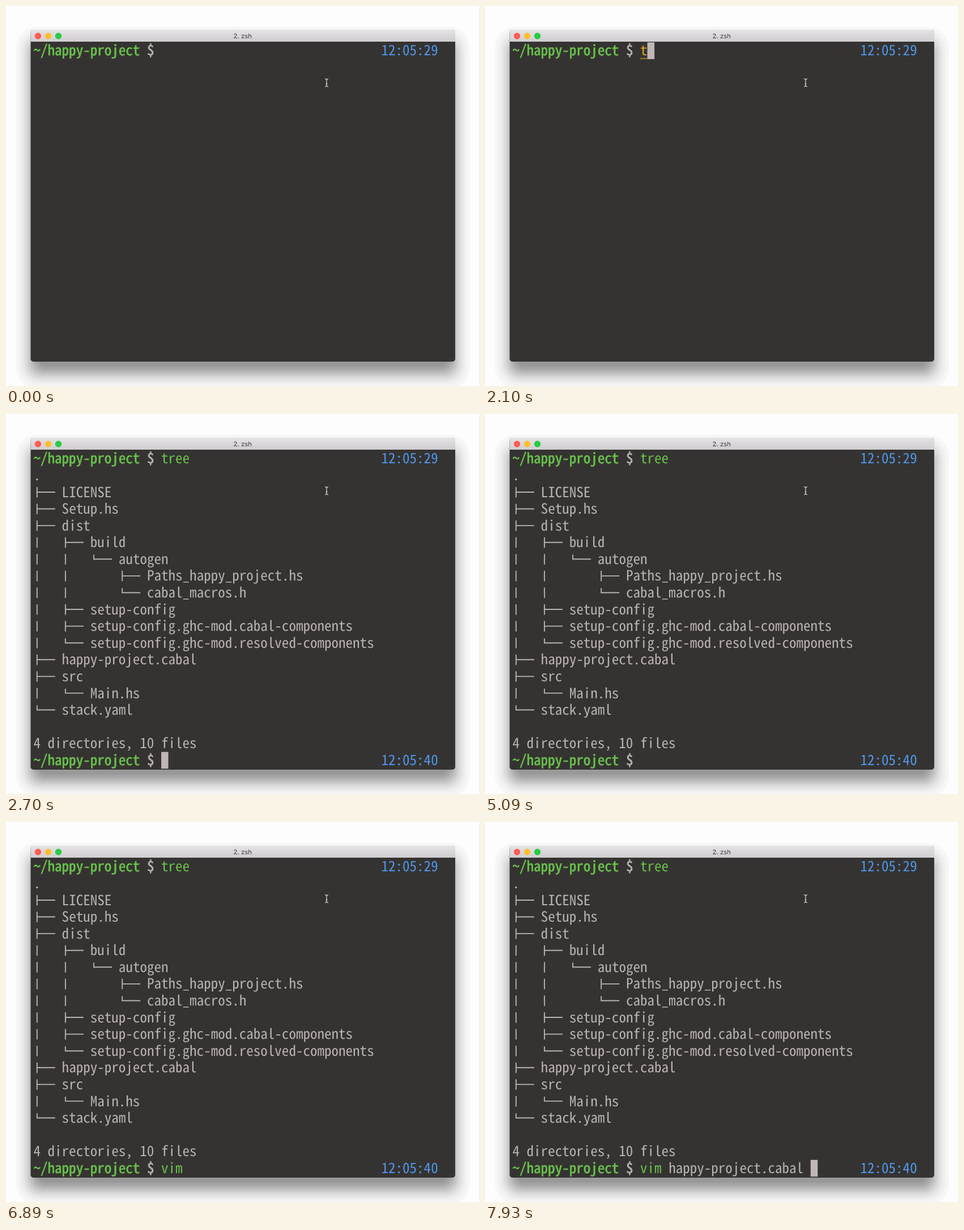
Animation, 835 px wide and 671 px high, one loop 8 s. Source, as an HTML page:

```html
<!DOCTYPE html>
<html lang="en">
<head>
<meta charset="utf-8">
<title>Terminal</title>
<style>
  html, body { margin: 0; width: 100%; height: 100%; overflow: hidden; background: #fdfdfd; }
  svg { display: block; }
  text { white-space: pre; text-rendering: geometricPrecision; }
  .mono { font-family: "Noto Sans Mono CJK JP", "Noto Sans Mono CJK SC", "Noto Sans Mono", monospace; }
  .title { font: 11.4px Inter, sans-serif; fill: #3b3a3b; text-anchor: middle; }
</style>
</head>
<body>
<svg width="835" height="671" viewBox="0 0 835 671">
  <defs>
    <linearGradient id="bar" x2="0" y2="1">
      <stop stop-color="#e5e3e5"/><stop offset="1" stop-color="#cfcdcf"/>
    </linearGradient>
  </defs>
  <g id="shadow"></g>
  <rect x="43.5" y="42" width="749.5" height="586" rx="5" fill="#353331"/>
  <path d="M43.5 63V47q0-5 5-5H788q5 0 5 5V63z" fill="url(#bar)"/>
  <circle cx="56.5" cy="53" r="5.7" fill="#fd5b55"/>
  <circle cx="74.5" cy="53" r="5.7" fill="#fdbd2e"/>
  <circle cx="92.5" cy="53" r="5.7" fill="#28cb41"/>
  <text class="title" x="417.7" y="57.3">2. zsh</text>
  <g id="screen" class="mono"></g>
  <path d="M563 128.5q3 0 3 2.5v9q0 2.5-3 2.5M569 128.5q-3 0-3 2.5m0 9q0 2.5 3 2.5M564.5 137.5h3" fill="none" stroke="#e8e6e5" stroke-width="1.1"/>
</svg>
<script>
const LOOP = 8000, LISTED = 2700;
const CELL = 12.53, ROW = 29.58, LEFT = 48.5, TOP = 64.2;
const GREEN = '#69c24c', GRAY = '#bab3b0', BLUE = '#4e97ec', YELLOW = '#dfa424', CURSOR = '#bfb7b5';
const PROMPT = '~/happy-project', START = 18, LAST_ROW = 18;

const listing = `.
├── LICENSE
├── Setup.hs
├── dist
│   ├── build
│   │   └── autogen
│   │       ├── Paths_happy_project.hs
│   │       └── cabal_macros.h
│   ├── setup-config
│   ├── setup-config.ghc-mod.cabal-components
│   └── setup-config.ghc-mod.resolved-components
├── happy-project.cabal
├── src
│   └── Main.hs
└── stack.yaml

4 directories, 10 files`.split('\n');

// [start time, typed input, cursor visible]
const steps = [
  [0, '', false], [600, '', true], [1650, '', false],
  [2100, 't', true], [2250, 'tr', true], [2400, 'tre', true], [2550, 'tree', true],
  [LISTED, '', true], [5090, '', false],
  [5240, 'v', true], [5390, 'vim ', true], [6890, 'vim ', false],
  [7340, 'vim h', true], [7480, 'vim ha', true], [7630, 'vim hap', true],
  [7780, 'vim happy', true], [7930, 'vim happy-project.cabal ', true]
];
const commands = ['tr', 'tree', 'vim'];

const byId = id => document.getElementById(id);
const colX = col => LEFT + col * CELL;
const rowY = row => TOP + row * ROW;

const rect = (x, y, w, h, fill, rx = 0) =>
  `<rect x="${x}" y="${y}" width="${w}" height="${h}" rx="${rx}" fill="${fill}"/>`;

const put = (col, row, str, fill, heavy) =>
  `<text x="${colX(col)}" y="${rowY(row) + 23.2}" fill="${fill}"` +
  (heavy ? ` stroke="${fill}" stroke-width=".7"` : '') + `>${str}</text>`;

const underline = (col, row, length, fill) =>
  rect(colX(col), rowY(row) + 28, length * CELL, 1.2, fill);

function branch(col, row, sign) {
  const x = colX(col) + 6.3, y = rowY(row) + 14.6;
  const arm = `M${x - 1} ${y}H${x + 32}`;
  const d = {
    '│': `M${x} ${y - 9}V${y + 9.5}`,
    '├': `M${x} ${y - 9}V${y + 9.5}${arm}`,
    '└': `M${x} ${y - 8}V${y}${arm}`
  }[sign];
  return `<path d="${d}" fill="none" stroke="${GRAY}" stroke-width="1.9"/>`;
}

const promptLine = (row, clock) =>
  put(0, row, PROMPT, GREEN, true) + put(16, row, '$', GRAY, true) + put(49, row, clock, BLUE);

function treeLine(line, i) {
  const row = i + 1, indent = line.match(/^[│├└─ ]*/)[0];
  const signs = [...indent].map((c, col) => '│├└'.includes(c) ? branch(col, row, c) : '');
  return signs.join('') + put(indent.length, row, line.slice(indent.length), GRAY);
}

function inputLine(row, input, cursor) {
  const [command, arg = ''] = input.split(' ');
  const argCol = START + command.length + 1;
  const known = commands.includes(command);
  const color = known ? GREEN : YELLOW;
  let out = put(START, row, command, color);
  if (command && !known) out += underline(START, row, command.length, color);
  if (arg) out += put(argCol, row, arg, GRAY);
  // an argument still being typed is marked as a path prefix
  if (arg && !input.endsWith(' ')) out += underline(argCol, row, arg.length, GRAY);
  if (cursor) out += rect(colX(START + input.length), rowY(row), CELL, 29.6, CURSOR);
  return out;
}

const firstPrompt = promptLine(0, '12:05:29');
const listed = firstPrompt + put(START, 0, 'tree', GREEN) +
  listing.map(treeLine).join('') + promptLine(LAST_ROW, '12:05:40');

function drawShadow() {
  const outsets = [26, 20, 15, 11, 7, 4, 1, -2, -5, -8, -12];
  const grays = [246, 240, 232, 222, 212, 202, 192, 182, 172, 163, 153];
  byId('shadow').innerHTML = outsets.map((o, i) =>
    rect(43.5 - o, 63 - o, 749.5 + 2 * o, 586 + 2 * o,
      `rgb(${grays[i]},${grays[i]},${grays[i]})`, 22 + o * 0.6)).join('');
}

// choose the font size whose advance equals one terminal cell
function fitFont() {
  const screen = byId('screen');
  screen.style.fontSize = '100px';
  screen.innerHTML = '<text>nnnnnnnnnn</text>';
  const advance = screen.firstChild.getComputedTextLength() / 1000;
  screen.style.fontSize = CELL / advance + 'px';
}

let shown;
function frame(now) {
  const t = (now - began) % LOOP;
  const step = steps.findLast(s => s[0] <= t) || steps[0];
  if (step !== shown) {
    shown = step;
    const [time, input, cursor] = step, done = time >= LISTED;
    byId('screen').innerHTML = (done ? listed : firstPrompt) +
      inputLine(done ? LAST_ROW : 0, input, cursor);
  }
  requestAnimationFrame(frame);
}

drawShadow();
fitFont();
const began = performance.now();
frame(began);
</script>
</body>
</html>
```
